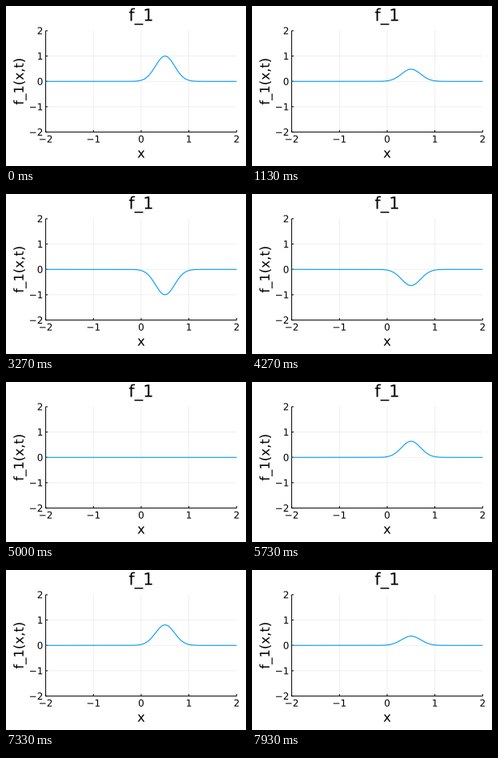
These frames come from a looping animation (300x200 px, 8000 ms). A matplotlib script:

```python
import numpy as np
import matplotlib.pyplot as plt
from matplotlib.animation import FuncAnimation
from matplotlib.patches import PathPatch
from matplotlib.textpath import TextPath
from matplotlib.transforms import Affine2D

W, H, DPI = 300, 200, 100
STEPS, SUB, LOOP_MS = 120, 3, 8000   # wave steps, draws per step, loop length
PERIOD = 100                         # wave steps per oscillation
LEFT, RIGHT, TOP, BOTTOM = 49.6, 288.3, 30.9, 157.6
PT = 72 / DPI                        # points per pixel
UNIT_X, UNIT_Y = (RIGHT - LEFT) / 4, (BOTTOM - TOP) / 4

plt.rcParams["font.family"] = "DejaVu Sans"
plt.rcParams["path.snap"] = False
fig = plt.figure(figsize=(W / DPI, H / DPI), dpi=DPI, facecolor="white")

# The whole stage in pixels, y down
stage = fig.add_axes([0, 0, 1, 1], xlim=(0, W), ylim=(H, 0))
stage.axis("off")


def px(v):
    return LEFT + (v + 2) * UNIT_X


def py(v):
    return BOTTOM - (v + 2) * UNIT_Y


def line(xs, ys, color="black", width=1.0, **kw):
    return stage.plot(xs, ys, color=color, linewidth=width * PT,
                      solid_capstyle="butt", **kw)[0]


def label(x, y, text, size, align=0.5, turn=0):
    """Outlined text; align is the share of its advance left of (x, y)."""
    path = TextPath((0, 0), text, size=size)
    # a trailing bar gives the advance, side bearings included
    bar = TextPath((0, 0), "|", size=size).get_extents().x1
    advance = TextPath((0, 0), text + "|", size=size).get_extents().x1 - bar
    place = (Affine2D().translate(-align * advance, 0).scale(1, -1)
             .rotate_deg(-turn).translate(x, y))
    stage.add_patch(PathPatch(place.transform_path(path), fc="black", lw=0))


for v in (-1, 0, 1):
    line([px(v)] * 2, [TOP, BOTTOM], width=0.6, alpha=0.1)
    line([LEFT, RIGHT], [py(v)] * 2, width=0.6, alpha=0.1)

line([LEFT, LEFT], [TOP, BOTTOM])
line([LEFT, RIGHT], [BOTTOM, BOTTOM])
for v in range(-2, 3):
    line([px(v)] * 2, [BOTTOM, BOTTOM - 2.6])
    line([LEFT, LEFT + 2.6], [py(v)] * 2)
    name = str(v).replace("-", "\u2212")
    label(px(v), 170.6, name, 12)
    label(46.4, py(v) + 4.4, name, 12, align=1)

label(px(0), 18.6, "f_1", 21)
label(px(0), 189.6, "x", 16.5)
label(21.8, py(0), "f_1(x,t)", 16.5, turn=90)

x = np.linspace(-2, 2, 401)
bump = np.exp(-((x - 0.5) / 0.2) ** 2 / 2)
curve = line(px(x), py(bump), color="#009AFA", width=1.1)


def draw(i):
    step = (i + 1) // SUB
    curve.set_ydata(py(np.cos(2 * np.pi * step / PERIOD) * bump))
    return curve,


ani = FuncAnimation(fig, draw, frames=STEPS * SUB,
                    interval=LOOP_MS / (STEPS * SUB),
                    repeat=True, repeat_delay=0)
plt.show()
```
